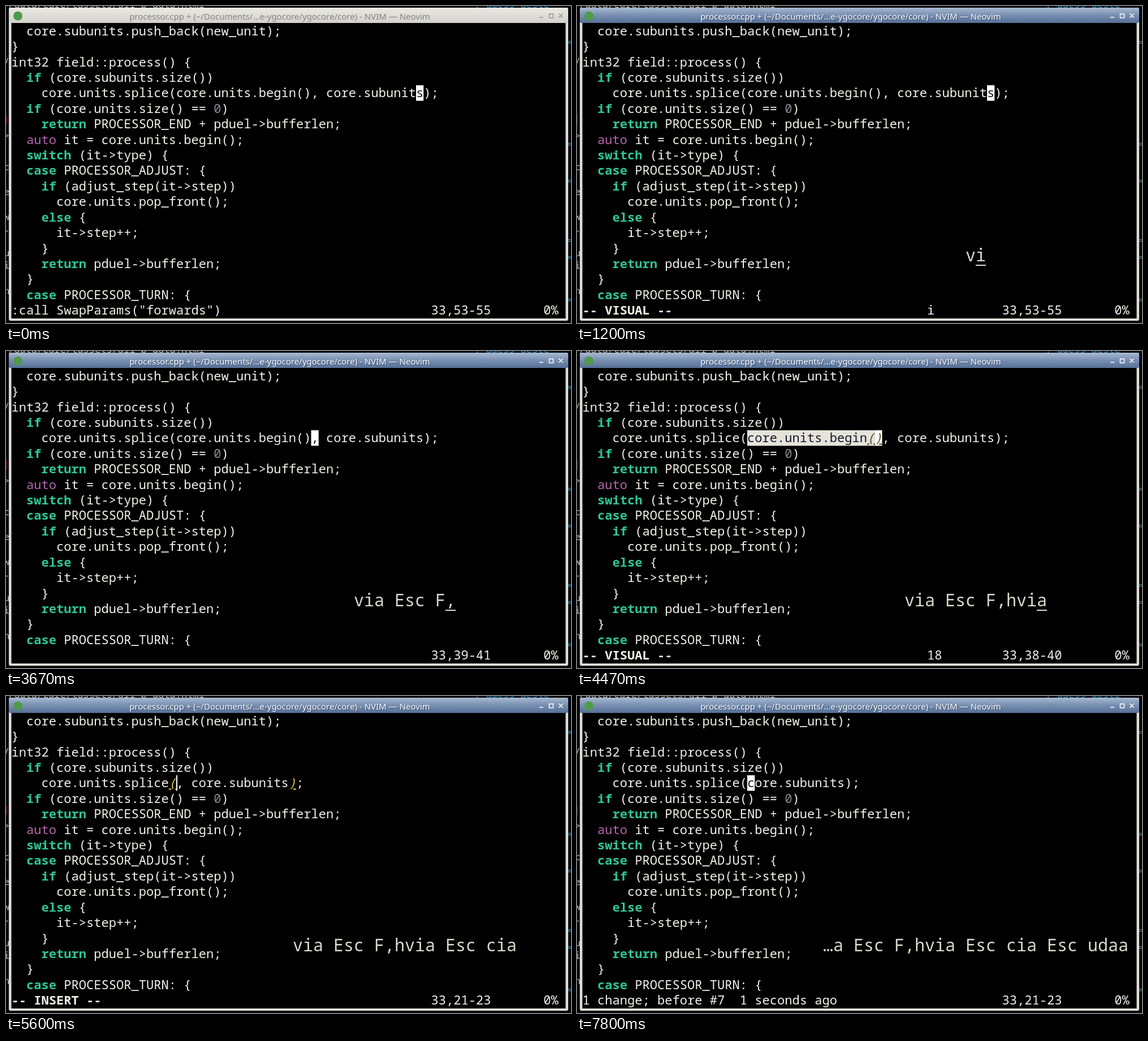
Animation, 999 px wide and 560 px high, one loop 8000 ms. Source, as an HTML page:

```html
<!DOCTYPE html>
<html lang="en">
<head>
<meta charset="utf-8">
<title>Editor text objects</title>
<style>
  html, body { margin: 0; width: 100%; height: 100%; overflow: hidden; background: #05070c; }
  svg { display: block; }
  text { white-space: pre; font: 22.08px "Noto Sans Mono", "DejaVu Sans Mono", monospace; fill: #f4f2e8; font-variant-ligatures: none; }
  .title { font: 15px "Noto Sans", "Open Sans", sans-serif; }
  .keys { font-size: 30px; font-weight: 300; fill: #dcd9cc; }
  .behind text { font-size: 17px; fill: #b9b9ae; }
  .behind .blue { fill: #2f86b5; }
  .behind .red { fill: #b03038; }
  .keyword { fill: #2fc596; font-weight: 700; }
  .type { fill: #b564ad; }
  .number { fill: #868b92; }
  .mode { font-weight: 700; }
  .dark { fill: #10182c; }
  .match { fill: #dcc33c; font-style: italic; text-decoration: underline; }
  .dark.match { fill: #5b5328; }
</style>
</head>
<body>
<svg id="stage" width="999" height="560" viewBox="0 0 999 560">
  <defs>
    <linearGradient id="active" x2="0" y2="1">
      <stop offset="0" stop-color="#a9bad1"/>
      <stop offset=".45" stop-color="#7b92b3"/>
      <stop offset="1" stop-color="#566f95"/>
    </linearGradient>
    <linearGradient id="inactive" x2="0" y2="1">
      <stop offset="0" stop-color="#ebe9e3"/>
      <stop offset="1" stop-color="#d3d1cb"/>
    </linearGradient>
  </defs>
  <rect width="999" height="560" fill="#05070c"/>
  <g class="behind" id="behind"></g>
  <rect x="5" y="3" width="989" height="553" rx="3" fill="#deddd5"/>
  <rect id="bar" x="5" y="3" width="989" height="27" rx="3"/>
  <circle cx="21" cy="17.5" r="8" fill="#4f9a4c"/>
  <text id="title" class="title" x="484" y="24" text-anchor="middle">processor.cpp + (~/Documents/...e-ygocore/ygocore/core) - NVIM — Neovim</text>
  <path id="buttons" d="M943 20h7M960.5 14h7v7h-7zM977.5 13.5l7 7m0-7l-7 7" fill="none" stroke-width="1.5"/>
  <rect x="9.5" y="30" width="980" height="522" fill="#000"/>
  <g id="code"></g>
  <g id="live"></g>
</svg>
<script>
const CELL = 13.25, LEFT = 9.5, TOP = 30.4, ROW = 27.41, KEY = 18;
const LOOP = 8000, EDIT_ROW = 4, STATUS_ROW = 18;
const byId = id => document.getElementById(id);
const colX = n => LEFT + n * CELL;
const rowY = n => TOP + n * ROW;

function add(parent, tag, attrs, content) {
  const node = document.createElementNS('http://www.w3.org/2000/svg', tag);
  for (const name in attrs) node.setAttribute(name, attrs[name]);
  if (content !== undefined) node.textContent = content;
  return parent.appendChild(node);
}

const textAt = (parent, row, column, content, cls = '') =>
  add(parent, 'text', { x: colX(column), y: rowY(row) + 21.4, class: cls }, content);

const box = (x, y, width, height, fill) =>
  add(byId('live'), 'rect', { x, y, width, height, fill });

// The edited row is left blank here and drawn by drawLine
const program = `  core.subunits.push_back(new_unit);
}
int32 field::process() {
  if (core.subunits.size())

  if (core.units.size() == 0)
    return PROCESSOR_END + pduel->bufferlen;
  auto it = core.units.begin();
  switch (it->type) {
  case PROCESSOR_ADJUST: {
    if (adjust_step(it->step))
      core.units.pop_front();
    else {
      it->step++;
    }
    return pduel->bufferlen;
  }
  case PROCESSOR_TURN: {`;

function tokenClass(token) {
  if (token === 'auto') return 'type';
  if (token === '0') return 'number';
  return /^(if|else|return|switch|case)$/.test(token) ? 'keyword' : '';
}

program.split('\n').forEach((line, row) => {
  const text = textAt(byId('code'), row, 0, '');
  for (const token of line.split(/\b(if|else|return|switch|case|auto|0)\b/))
    add(text, 'tspan', { class: tokenClass(token) }, token);
});

// Slivers of the terminal showing around the window
const sliver = (x, y, content, cls = '') => add(byId('behind'), 'text', { x, y, class: cls }, content);
sliver(4, 3, '/data/care/tassets/all-b-data.html');
sliver(828, 3, '; guess_deste', 'blue');
[[104, '/'], [235, '>'], [290, 'c'], [334, 'e'], [378, 'w'], [402, '-'], [442, 'u'], [464, 'i'], [509, 'n']]
  .forEach(([y, glyph]) => sliver(-4, y, glyph));
sliver(-5, 206, '|', 'red');
[70, 250, 315, 420, 450, 525].forEach(y => sliver(992, y, '=', 'blue'));

const FULL = '    core.units.splice(core.units.begin(), core.subunits);';
const EMPTY = '    core.units.splice(, core.subunits);';
const SHORT = '    core.units.splice(core.subunits);';
const VISUAL = '-- VISUAL --', INSERT = '-- INSERT --';
const UNDO = '1 change; before #7  1 seconds ago';

// Each step changes only the listed parts of the state; mark = underlined keys
const steps = [
  [0, { focus: false, line: FULL, cursor: 54, select: null, match: [], status: ':call SwapParams("forwards")', pending: '', keys: '', mark: 0 }],
  [70, { focus: true }],
  [1000, { keys: 'v', mark: 1, status: VISUAL, pending: '1', select: 54 }],
  [1130, { keys: 'vi', pending: 'i' }],
  [1270, { keys: 'via', pending: '13', select: 42 }],
  [1470, { mark: 0 }],
  [2330, { keys: 'via Esc', mark: 3, status: '', pending: '', select: null }],
  [2600, { mark: 0 }],
  [3400, { keys: 'via Esc F', mark: 1, pending: 'F' }],
  [3670, { keys: 'via Esc F,', pending: '', cursor: 40 }],
  [3870, { mark: 0 }],
  [4070, { keys: 'via Esc F,h', mark: 1, cursor: 39, match: [38, 39] }],
  [4270, { keys: 'via Esc F,hv', status: VISUAL, pending: '1', select: 39 }],
  [4400, { keys: 'via Esc F,hvi', pending: 'i' }],
  [4470, { keys: 'via Esc F,hvia', pending: '18', select: 22 }],
  [4670, { mark: 0 }],
  [4870, { keys: 'via Esc F,hvia Esc', mark: 3, status: '', pending: '', select: null }],
  [5070, { mark: 0 }],
  [5130, { keys: 'via Esc F,hvia Esc c', mark: 1, pending: 'c' }],
  [5270, { keys: 'via Esc F,hvia Esc ci', pending: 'ci' }],
  [5400, { keys: 'via Esc F,hvia Esc cia', pending: '', line: EMPTY, cursor: 22, match: [21, 37], status: INSERT }],
  [5600, { mark: 0 }],
  [6130, { keys: 'via Esc F,hvia Esc cia Esc', mark: 3, cursor: 21, status: '' }],
  [6400, { mark: 0 }],
  [6730, { keys: 'via Esc F,hvia Esc cia Esc u', mark: 1, line: FULL, cursor: 22, match: [], status: UNDO }],
  [6930, { mark: 0 }],
  [7270, { keys: 'via Esc F,hvia Esc cia Esc ud', mark: 1, pending: 'd' }],
  [7400, { keys: 'via Esc F,hvia Esc cia Esc uda', pending: 'da' }],
  [7600, { keys: '…a Esc F,hvia Esc cia Esc udaa', pending: '', line: SHORT }],
  [7800, { mark: 0 }],
];

let current = {};
const states = steps.map(([time, change]) => ({ time, ...(current = { ...current, ...change }) }));

function drawWindow({ focus }) {
  byId('bar').setAttribute('fill', focus ? 'url(#active)' : 'url(#inactive)');
  byId('title').style.fill = focus ? '#fff' : '#85847f';
  byId('title').style.textShadow = focus ? '1px 1px 1px #34486a' : 'none';
  byId('buttons').setAttribute('stroke', focus ? '#fff' : '#96958f');
}

function drawLine({ line, cursor, select, match, status }) {
  const y = rowY(EDIT_ROW), inserting = status === INSERT;
  if (select !== null) box(colX(select), y, (cursor - select) * CELL, ROW, '#e6e3da');
  box(colX(cursor), y, inserting ? 2 : CELL, ROW, '#fff');
  const text = textAt(byId('live'), EDIT_ROW, 0, '');
  [...line].forEach((char, i) => {
    const dark = i === cursor && !inserting || select !== null && i >= select && i <= cursor;
    add(text, 'tspan', { class: (dark ? 'dark ' : '') + (match.includes(i) ? 'match' : '') }, char);
  });
}

function drawStatus({ status, pending, cursor }) {
  const live = byId('live');
  textAt(live, STATUS_ROW, 0, status, status.startsWith('--') ? 'mode' : '');
  textAt(live, STATUS_ROW, 46, pending);
  textAt(live, STATUS_ROW, 56, `33,${cursor - 1}-${cursor + 1}`);
  textAt(live, STATUS_ROW, 71, '0%');
}

function drawKeys({ keys, mark }) {
  const half = keys.length * KEY / 2;
  add(byId('live'), 'text', { x: 705 - half, y: 450.5, class: 'keys' }, keys);
  if (mark) box(705 + half - mark * KEY, 457, mark * KEY, 2, '#dcd9cc');
}

let shown = null;
function render(elapsed) {
  const time = elapsed % LOOP;
  const state = states.findLast(s => s.time <= time) || states[0];
  if (state === shown) return;
  shown = state;
  byId('live').replaceChildren();
  [drawWindow, drawLine, drawStatus, drawKeys].forEach(draw => draw(state));
}

const startTime = performance.now();
function tick() {
  render(performance.now() - startTime);
  requestAnimationFrame(tick);
}
tick();
</script>
</body>
</html>
```
